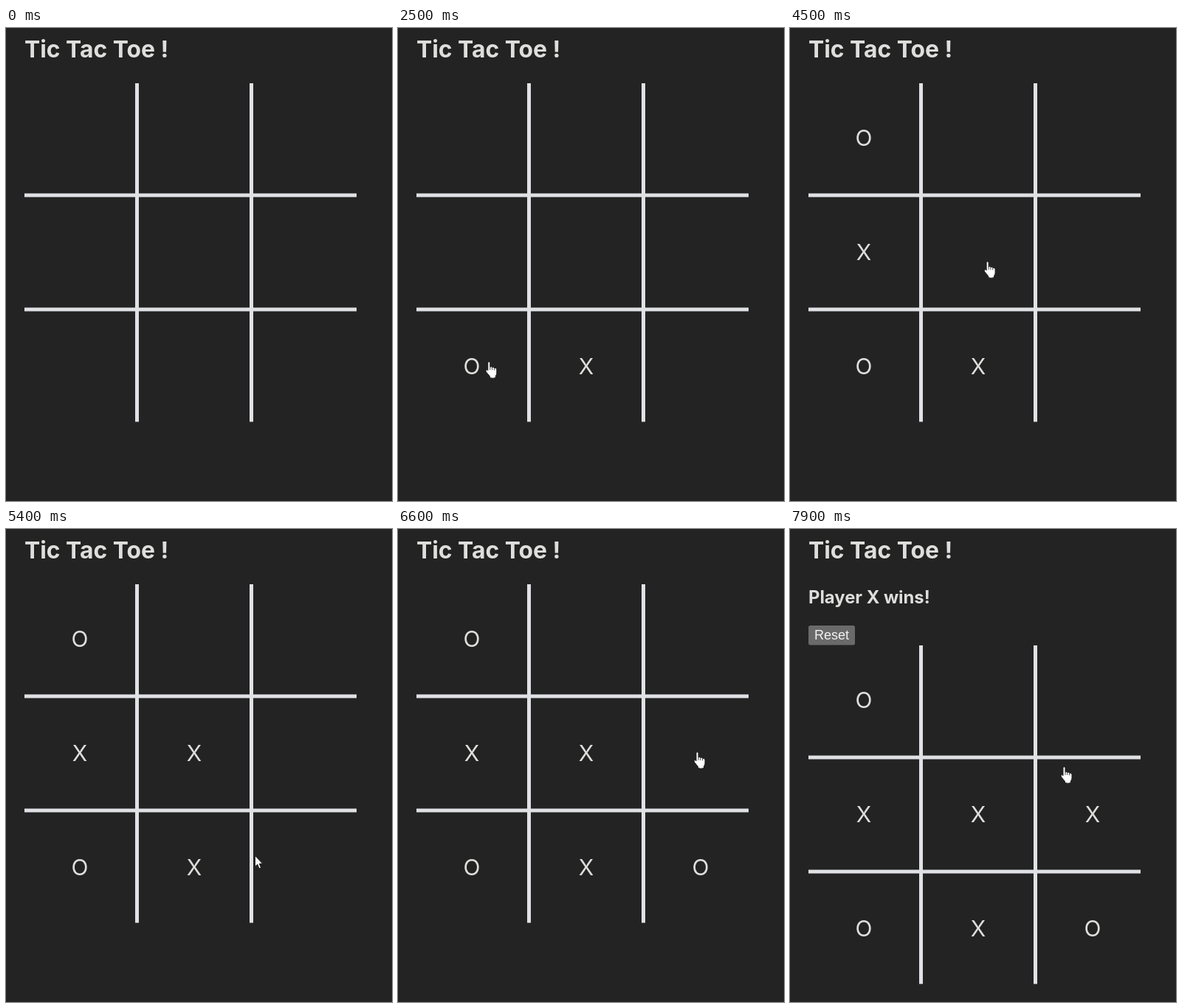
Animation, 523 px wide and 642 px high, one loop 8 s. Source, as an HTML page:

```html
<!DOCTYPE html>
<html lang="en">
<head>
<meta charset="utf-8">
<title>Tic Tac Toe</title>
<style>
  html, body { margin: 0; height: 100%; overflow: hidden; background: #232323; }
  svg { display: block; width: 523px; height: 642px; fill: #dededc; font-family: Inter, sans-serif; }
  .bold { font-weight: 700; }
  #marks { font-size: 30px; text-anchor: middle; }
  #cursor path { fill: #fff; stroke: #1c1c1c; stroke-width: 1; stroke-linejoin: round; }
</style>
</head>
<body>
<svg viewBox="0 0 523 642">
  <text class="bold" x="25" y="40" font-size="31.8">Tic Tac Toe !</text>
  <g id="result">
    <text class="bold" x="25" y="101" font-size="23.8">Player X wins!</text>
    <rect x="25" y="131" width="63" height="26.5" rx="2.5" fill="#6a6a6a"/>
    <text x="33" y="150" font-size="18" fill="#f2f2f2" font-family="Liberation Sans, Arial, sans-serif">Reset</text>
  </g>
  <g id="board">
    <path d="M25 227H475M25 382H475M177.5 75V534.5M332.5 75V534.5" stroke="#e0e1e4" stroke-width="5"/>
    <g id="marks"></g>
  </g>
  <g id="cursor">
    <g id="hand">
      <path d="M4 2.5Q4 .8 5.5 .8T7 2.5V8Q9 6.8 9.8 8.4Q12 7.4 12.6 9.2Q16 8.6 16 11.5V16Q16 18.5 14.5 20V22.5Q10.5 24 6.5 22.5V20.5L1.5 14.5Q.5 12 2.5 11.5L4 12.8Z"/>
      <path d="M7 8V12M9.8 8.4V12M12.6 9.2V12.4" style="stroke-width:.8"/>
    </g>
    <path id="arrow" d="M.5 .5V15.5L3.8 12.4L6 18L8.6 17L6.3 11.6H10.7Z"/>
  </g>
</svg>
<script>
const LOOP = 8000, STEP = 100, GLIDE = 500, SHIFT = 83;
const LEFT = 25, TOP = 75, CELL = 150, GAP = 5, PITCH = CELL + GAP;
const $ = id => document.getElementById(id);

// Where the pointer rests; each click marks the cell beneath it
const start = { x: 1076, y: 783 };
const stops = [
  { arrive: 700, x: 256, y: 463, click: 1000 },
  { arrive: 1800, x: 118, y: 457, click: 2000 },
  { arrive: 2900, x: 112, y: 305, click: 2900 },
  { arrive: 3600, x: 114, y: 199, click: 4000 },
  { arrive: 4600, x: 267, y: 320, click: 4800 },
  { arrive: 5600, x: 361, y: 485, click: 5900 },
  { arrive: 6600, x: 400, y: 302, click: 7000 },
  { arrive: 7900, x: 366, y: 322 }
];
const clicks = stops.filter(s => s.click);
const win = clicks.at(-1).click;

const marks = clicks.map(({ x, y, click }, i) => {
  const el = document.createElementNS('http://www.w3.org/2000/svg', 'text');
  const center = (v, origin) => origin + CELL / 2 + PITCH * Math.floor((v - origin) / PITCH);
  el.textContent = 'XO'[i % 2];
  el.setAttribute('x', center(x, LEFT));
  el.setAttribute('y', center(y, TOP) + 10);
  $('marks').append(el);
  return { el, click };
});

const show = (el, on) => el.setAttribute('visibility', on ? 'visible' : 'hidden');
const ease = k => k < .5 ? 4 * k ** 3 : 1 - 4 * (1 - k) ** 3;
const inCell = v => v % PITCH >= GAP && v < 3 * PITCH;

function pointerAt(t) {
  let { x, y } = start;
  for (const s of stops) {
    const k = ease(Math.min(1, Math.max(0, (t - s.arrive + GLIDE) / GLIDE)));
    x += (s.x - x) * k;
    y += (s.y - y) * k;
  }
  return [x, y];
}

function draw(now) {
  const t = Math.floor(now % LOOP / STEP) * STEP;
  const shift = t >= win ? SHIFT : 0;
  marks.forEach(m => show(m.el, t >= m.click));
  show($('result'), shift);
  $('board').setAttribute('transform', `translate(0 ${shift})`);

  const [x, y] = pointerAt(t);
  const hover = inCell(x - LEFT) && inCell(y - TOP - shift);
  $('cursor').setAttribute('transform', `translate(${x} ${y})`);
  show($('hand'), hover);
  show($('arrow'), !hover);
  requestAnimationFrame(draw);
}
requestAnimationFrame(draw);
</script>
</body>
</html>
```
